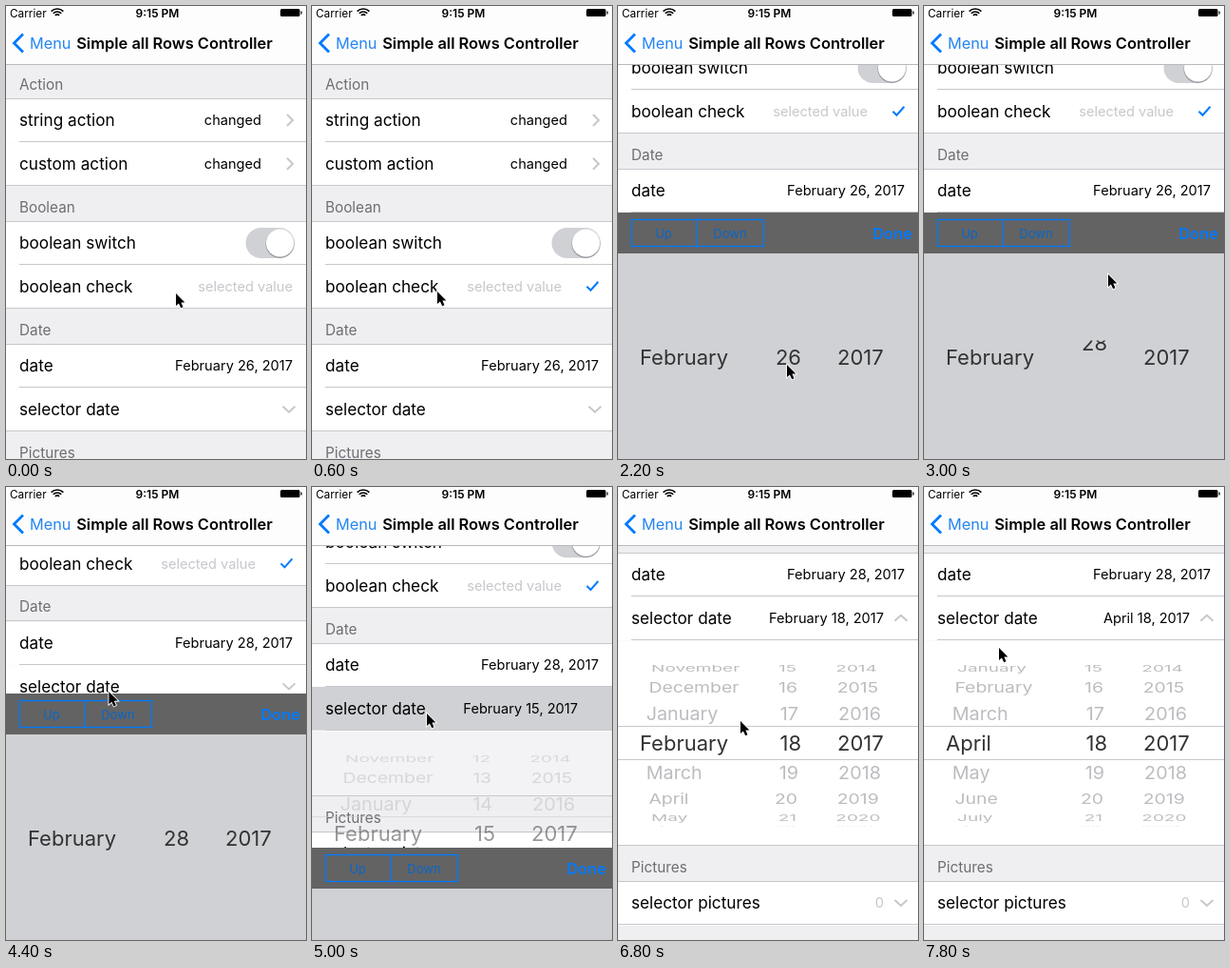
An HTML page with a canvas for the animation above (8 s loop, 316 by 476 pixels).

```html
<!DOCTYPE html>
<html lang="en">
<head>
<meta charset="utf-8">
<title>Form rows</title>
<style>
  html, body { margin: 0; width: 100%; height: 100%; overflow: hidden; background: #fff; }
  canvas { display: block; width: 316px; height: 476px; }
</style>
</head>
<body>
<canvas id="stage"></canvas>
<script>
const W = 316, H = 476, LOOP = 8000, STEP = 200;
const ROW = 45.75, HEADER = 37.5, PICKER = 216, KEYBOARD = 259;
const BLUE = '#007aff', LINE = '#c8c7cc', PALE = '#c7c7cc', GROUP = '#efeff2', GRAY = '#d0d1d5';
const MONTHS = ['January', 'February', 'March', 'April', 'May', 'June', 'July',
  'August', 'September', 'October', 'November', 'December'];

const canvas = document.getElementById('stage');
const ctx = canvas.getContext('2d');
const ratio = window.devicePixelRatio || 1;
canvas.width = W * ratio;
canvas.height = H * ratio;

// Progress from 0 to 1 between two times, plain or eased.
const ramp = (t, start, end) => Math.min(1, Math.max(0, (t - start) / (end - start)));
const smooth = (...args) => { const p = ramp(...args); return p * p * (3 - 2 * p); };
const easeOut = (...args) => 1 - (1 - ramp(...args)) ** 2;

// Stops of the pointer: time, x, y.
const stops = [
  [0, 179, 302], [600, 132, 300], [1200, 136, 409], [1400, 154, 377], [2400, 184, 377],
  [3000, 194, 282], [4000, 100, 200], [5000, 121, 238], [5800, 225, 260],
  [6600, 183, 212], [7000, 75, 280], [7800, 79, 169]
];

function pointer(t) {
  let [, x, y] = stops[0];
  for (let i = 1; i < stops.length; i++) {
    const p = ramp(t, stops[i - 1][0], stops[i][0]);
    x += (stops[i][1] - stops[i - 1][1]) * p;
    y += (stops[i][2] - stops[i - 1][2]) * p;
  }
  return [x, y];
}

function text(str, x, y, size, color = '#000', align = 'left', weight = 400) {
  ctx.font = `${weight} ${size}px Inter, sans-serif`;
  ctx.textAlign = align;
  ctx.fillStyle = color;
  ctx.fillText(str, x, y + size * 0.36);
}

function box(x, y, w, h, color) {
  ctx.fillStyle = color;
  ctx.fillRect(x, y, w, h);
}

function pill(x, y, w, h, r, color) {
  ctx.beginPath();
  ctx.roundRect(x, y, w, h, r);
  ctx.fillStyle = color;
  ctx.fill();
}

function path(points, color, width) {
  ctx.beginPath();
  points.forEach(([x, y]) => ctx.lineTo(x, y));
  ctx.strokeStyle = color;
  ctx.lineWidth = width;
  ctx.stroke();
}

function faded(alpha, draw) {
  ctx.save();
  ctx.globalAlpha *= alpha;
  draw();
  ctx.restore();
}

function clipped(rects, draw) {
  ctx.save();
  ctx.beginPath();
  rects.forEach(r => ctx.rect(...r));
  ctx.clip();
  draw();
  ctx.restore();
}

const rule = (y, x = 0, color = LINE) => box(x, Math.floor(y), W - x, 1, color);
const value = (str, right, y, color) => text(str, right, y, 14.6, color, 'right');
const chevronRight = y => path([[296, y - 6], [302, y], [296, y + 6]], PALE, 2);
const chevronDown = (y, dir = 1) => path([[291.5, y - 3 * dir], [298, y + 3 * dir], [304.5, y - 3 * dir]], PALE, 2);

function header(label, y) {
  box(0, y, W, HEADER, GROUP);
  rule(y);
  rule(y + HEADER);
  text(label, 14, y + 22.5, 15.3, '#6d6d72');
}

function row(label, y, last) {
  box(0, y + 1, W, ROW, '#fff');
  rule(y + ROW, last ? 0 : 14);
  text(label, 14, y + 23, 17.2);
}

function toggle(y) {
  pill(252.5, y - 16, 51.5, 32, 16, GRAY);
  pill(273.5, y - 14, 30, 30, 15, '#9a9aa0');
  pill(274, y - 14.6, 29.2, 29.2, 14.6, '#fff');
}

// x in the centre band, x of the side rows, and their drift per row.
const columns = [
  { x: 23, side: 27, drift: 2.7, align: 'left', label: i => MONTHS[(i + 12) % 12] },
  { x: 193, side: 191, drift: -1, align: 'right', label: i => String((i + 30) % 31 + 1) },
  { x: 231, side: 233.5, drift: -1.4, align: 'left', label: String }
];

function band(cy, values, maxDay = 31) {
  clipped([[0, cy - 18, W, 36]], () => columns.forEach((col, c) => {
    const v = values[c];
    for (let i = Math.floor(v); i <= Math.ceil(v); i++) {
      if (c === 1 && i > maxDay) continue;
      text(col.label(i), col.x, cy + (i - v) * 34, 22, '#333', col.align);
    }
  }));
}

// Side rows lie on a cylinder of radius 90.
function drum(cy, values) {
  clipped([[0, cy - 88, W, 70], [0, cy + 18, W, 70]], () => columns.forEach((col, c) => {
    const v = values[c];
    for (let i = Math.round(v) - 4; i <= Math.round(v) + 4; i++) {
      const far = Math.abs(i - v), angle = (i - v) * 0.352, squash = Math.cos(angle);
      if (squash < 0.05) continue;
      faded(Math.min(1, 2 * squash), () => {
        ctx.translate(col.side + col.drift * far, cy + 90 * Math.sin(angle));
        ctx.scale(1, squash);
        text(col.label(i), 0, 0, 20.2 - 0.4 * far, '#bcbcc0', col.align);
      });
    }
  }));
}

function inlineWheels(top, values) {
  const cy = top + 108.5;
  drum(cy, values);
  band(cy, values);
  rule(cy - 18);
  rule(cy + 17);
  rule(top, 14);
}

function keyboard(top, day) {
  box(0, top, W, H - top, GRAY);
  box(0, top, W, 43, '#636363');
  ctx.strokeStyle = BLUE;
  ctx.lineWidth = 1.3;
  ctx.strokeRect(14.5, top + 7.5, 139, 28);
  box(82, top + 8, 1.3, 28, BLUE);
  text('Up', 48, top + 22, 13, '#0a66c8', 'center');
  text('Down', 118, top + 22, 13, '#0a66c8', 'center');
  text('Done', 310, top + 22, 16.5, BLUE, 'right', 600);
  band(top + 152.5, [1, day, 2017], 28);
}

function navigation() {
  box(0, 0, W, 61, '#fdfdfd');
  rule(61, 0, '#b9b9bb');
  text('Carrier', 4, 7.5, 11.8);
  for (const r of [3, 6, 9]) {
    ctx.beginPath();
    ctx.arc(54, 12, r, -Math.PI * 0.75, -Math.PI * 0.25);
    ctx.strokeStyle = '#000';
    ctx.lineWidth = 1.7;
    ctx.stroke();
  }
  text('9:15 PM', 159.5, 7.5, 12, '#000', 'center', 600);
  pill(289, 3, 20.5, 8, 1.5, '#000');
  box(310.5, 5.5, 1.2, 3, '#000');
  path([[18, 29.5], [8.5, 39], [18, 48.5]], BLUE, 2.8);
  text('Menu', 25, 39.5, 16.3, '#2585f2');
  text('Simple all Rows Controller', 177.5, 39.5, 16.45, '#000', 'center', 600);
}

function cursor(x, y) {
  ctx.save();
  ctx.translate(x, y);
  ctx.scale(0.87, 0.87);
  ctx.beginPath();
  [[0, 0], [0, 15], [3.4, 12], [6, 17.5], [8.6, 16.3], [6.2, 11], [10.8, 10.8]].forEach(p => ctx.lineTo(...p));
  ctx.closePath();
  ctx.lineWidth = 2;
  ctx.strokeStyle = '#fff';
  ctx.stroke();
  ctx.fillStyle = '#000';
  ctx.fill();
  ctx.restore();
}

function render(t) {
  const checked = t >= 600, open = t >= 5000;
  const drag = 41 * (smooth(t, 4000, 4600) - smooth(t, 4800, 5000));
  const scroll = 184 * smooth(t, 1600, 2000) + 102 * smooth(t, 4880, 5640) + drag;
  const raised = easeOut(t, 1600, 1990) - easeOut(t, 4800, 5315);
  const expand = PICKER * smooth(t, 4800, 5330);
  const fade = ramp(t, 4800, 5200);
  const highlight = ramp(t, 4600, 4800) - ramp(t, 5000, 5400);
  const firstDay = 26 + 2.45 * smooth(t, 2400, 3000) - 0.45 * smooth(t, 3000, 3400);
  const wheels = [1 + 2 * smooth(t, 7000, 7600), 15 + 3 * smooth(t, 6200, 6800), 2017];

  ctx.setTransform(ratio, 0, 0, ratio, 0, 0);
  box(0, 0, W, H, GROUP);

  let y = 59.5 - scroll;
  header('Action', y);
  y += HEADER;
  ['string action', 'custom action'].forEach((label, i) => {
    row(label, y, i === 1);
    value('changed', 269, y + 23);
    chevronRight(y + 23);
    y += ROW;
  });

  header('Boolean', y);
  y += HEADER;
  row('boolean switch', y);
  toggle(y + 23);
  y += ROW;
  row('boolean check', y, true);
  value('selected value', checked ? 263 : 302, y + 23, PALE);
  if (checked) path([[289.5, y + 23], [293.5, y + 27], [301.5, y + 18]], BLUE, 2);
  y += ROW;

  header('Date', y);
  y += HEADER;
  row('date', y);
  value(`February ${t >= 3400 ? 28 : 26}, 2017`, 302, y + 23);
  y += ROW;
  row('', y, !open);
  faded(highlight, () => box(0, y, W, ROW, GRAY));
  text('selector date', 14, y + 23, 17.2);
  if (open) {
    const day = t >= 6800 ? 18 : 15, month = t >= 7600 ? 'April' : 'February';
    value(`${month} ${day}, 2017`, 280, y + 23);
  }
  if (t < 4800) chevronDown(y + 23);
  if (t >= 5200) chevronDown(y + 23, -1);
  y += ROW;

  const pickerTop = y;
  faded(fade ** 2, () => box(0, pickerTop + 1, W, expand, '#fff'));
  y += expand;
  header('Pictures', y);
  y += HEADER;
  row('selector pictures', y, true);
  value('0', 280, y + 23, PALE);
  chevronDown(y + 23);
  faded(fade, () => inlineWheels(pickerTop, wheels));

  if (raised > 0) keyboard(Math.round(H - KEYBOARD * raised), firstDay);
  navigation();
  cursor(...pointer(t));
}

function tick() {
  render(Math.floor(performance.now() % LOOP / STEP) * STEP);
  requestAnimationFrame(tick);
}
tick();
</script>
</body>
</html>
```
